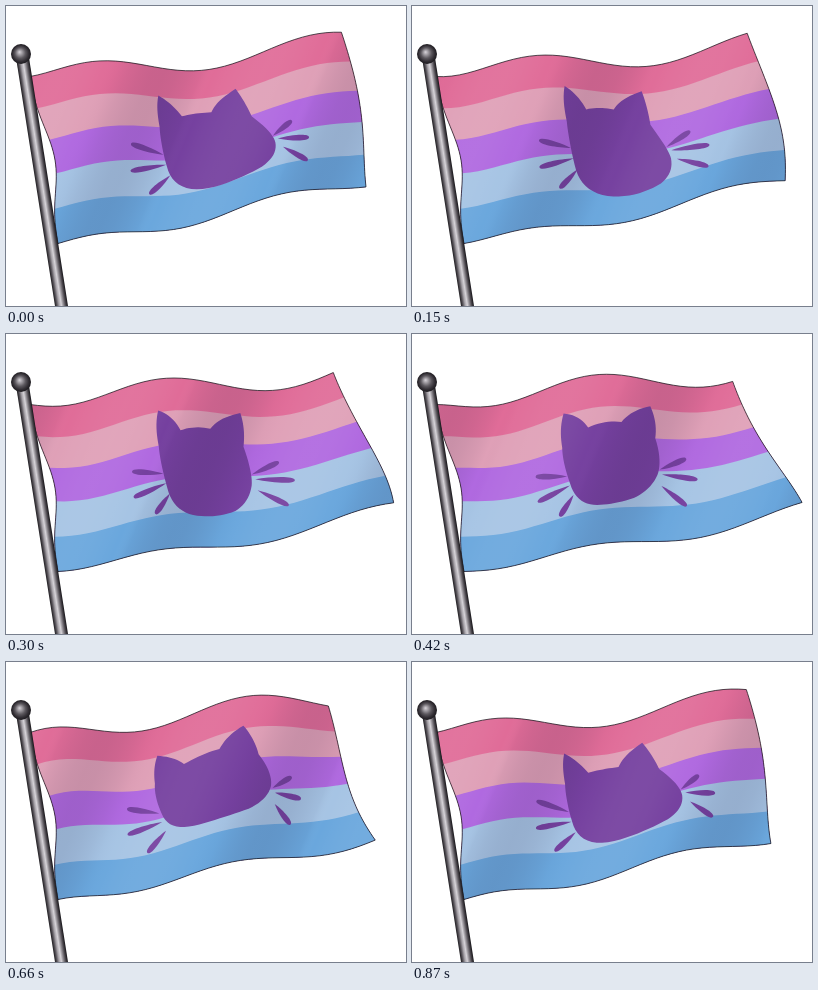
Recreate the animation shown at these times as an HTML page with a canvas. Size 400 px wide and 300 px high, loop 0.9 s.

```html
<!DOCTYPE html>
<html lang="en">
<head>
<meta charset="utf-8">
<title>Waving flag</title>
<style>
  html, body { margin: 0; width: 100%; height: 100%; overflow: hidden; background: #fff; }
  canvas { display: block; }
</style>
</head>
<body>
<canvas id="stage" width="400" height="300"></canvas>
<script>
const ctx = document.getElementById('stage').getContext('2d');
const LOOP = 900, STEP = 30, SAMPLES = 40;

// Stripe start (fraction of the cloth height) and colour.
const stripes = [[0, '#e06c98'], [.19, '#dfa0b7'], [.378, '#b069e0'], [.58, '#a6c4e4'], [.792, '#6aa7dd']];

// Head outline in cloth space: quadratic segments of control u, v and end u, v.
const headStart = [.397, .18];
const head = [
  [.44, .22, .455, .305], [.51, .28, .562, .292], [.60, .215, .668, .172], [.68, .27, .668, .39],
  [.69, .55, .678, .63], [.66, .73, .605, .775], [.535, .815, .46, .80], [.38, .78, .36, .65],
  [.34, .50, .36, .38], [.37, .27, .397, .18]];
// Base u, v and tip u, v.
const whiskers = [
  [.35, .545, .25, .485], [.355, .605, .243, .645], [.365, .67, .306, .78],
  [.684, .57, .766, .505], [.692, .60, .794, .645], [.692, .67, .756, .80]];

const wave = turns => Math.cos(2 * Math.PI * turns);

// The cloth at loop phase t: waves run from the pole (u = 0) to the free edge (u = 1).
function makeCloth(t) {
  const grow = u => 1 - Math.exp(-6 * u);
  const top = u => 70.5 - 33 * u - 12.5 * grow(u) * wave(t - 1.28 * u + .21);
  const bottom = u => 237.5 - 62.5 * u + 3.5 * Math.sin(Math.PI * u) - 7 * grow(u) * wave(t - 1.49 * u + .08);
  const left = v => 24 + 28 * v + 11 * Math.sin(Math.PI * v) ** 3;
  const right = v => 327.5 + 47 * v + (9 + 7 * v) * wave(t - .08 - .35 * v ** 1.5);

  const at = (u, v, dx = 0) => {
    const l = left(v), width = right(v) - l, s = u + dx / width;
    return [l + width * s, top(s) + (bottom(s) - top(s)) * v];
  };
  // The emblem's far side also sways sideways.
  const emblem = (u, v) => {
    const sway = Math.sin(Math.PI * Math.max(0, u - .3) / .7) ** 1.5;
    return at(u, v, 22 * sway * (.4 + .9 * v) * wave(t - .5 - .55 * v));
  };
  const chin = -.03 + .065 * wave(t - .2);
  return { at, emblem, chin };
}

function tracePath(points) {
  ctx.beginPath();
  points.forEach(p => ctx.lineTo(...p));
  ctx.closePath();
}

function traceCloth(cloth, v0) {
  const sides = [
    f => cloth.at(f, v0), f => cloth.at(1, v0 + (1 - v0) * f),
    f => cloth.at(1 - f, 1), f => cloth.at(0, 1 - (1 - v0) * f)];
  const points = [];
  for (const side of sides)
    for (let i = 0; i < SAMPLES; i++) points.push(side(i / SAMPLES));
  tracePath(points);
}

function drawHead(cloth) {
  const points = [];
  let [u, v] = headStart;
  for (const [cu, cv, eu, ev] of head) {
    for (let f = 0; f < 1; f += .1) {
      const g = 1 - f, mix = (a, c, e) => g * g * a + 2 * f * g * c + f * f * e;
      const y = mix(v, cv, ev);
      points.push(cloth.emblem(mix(u, cu, eu), y + cloth.chin * (y - .18) / .61));
    }
    [u, v] = [eu, ev];
  }
  tracePath(points);
  ctx.fill();
}

function drawWhisker(cloth, [bu, bv, tu, tv]) {
  const [x0, y0] = cloth.emblem(bu, bv), [x1, y1] = cloth.emblem(tu, tv);
  const len = Math.hypot(x1 - x0, y1 - y0);
  ctx.save();
  ctx.translate(x0, y0);
  ctx.rotate(Math.atan2(y1 - y0, x1 - x0));
  ctx.beginPath();
  ctx.moveTo(0, 0);
  ctx.bezierCurveTo(len * .4, -3, len, -4.5, len, 0);
  ctx.bezierCurveTo(len, 4.5, len * .4, 3, 0, 0);
  ctx.fill();
  ctx.restore();
}

function drawShade(cloth, t) {
  const reach = 460, shade = ctx.createLinearGradient(0, 0, reach * .92, reach * .38);
  for (let i = 0; i <= SAMPLES; i++) {
    const f = i / SAMPLES, w = wave(f * reach / 190 - t + .61);
    shade.addColorStop(f, w > 0 ? `rgba(255,255,255,${w * .06})` : `rgba(40,30,60,${-w * .13})`);
  }
  traceCloth(cloth, 0);
  ctx.fillStyle = shade;
  ctx.fill();
  ctx.strokeStyle = 'rgba(15,15,20,.8)';
  ctx.lineWidth = .9;
  ctx.stroke();
}

function metal(gradient, colors) {
  colors.forEach((c, i) => gradient.addColorStop(i / (colors.length - 1), c));
  ctx.fillStyle = gradient;
}

function drawPole() {
  const slant = .157, y = 52;
  ctx.save();
  ctx.transform(1, 0, slant, 1, -slant * 58, 0);
  metal(ctx.createLinearGradient(11, 0, 24, 0), ['#1c1a1e', '#5a565c', '#a8a4aa', '#d6d3d8', '#8e8a90', '#4a464c', '#141216']);
  ctx.fillRect(11, y, 13, 300 - y);
  ctx.restore();

  metal(ctx.createRadialGradient(13.5, 46, 0, 15, 48, 10.5), ['#d8d4da', '#9a969c', '#5c585e', '#343036', '#161418']);
  ctx.beginPath();
  ctx.arc(15, 48, 10, 0, 2 * Math.PI);
  ctx.fill();
}

function draw(ms) {
  const t = Math.floor(ms % LOOP / STEP) * STEP / LOOP;
  const cloth = makeCloth(t);
  ctx.fillStyle = '#fff';
  ctx.fillRect(0, 0, 400, 300);
  for (const [v, color] of stripes) {
    traceCloth(cloth, v);
    ctx.fillStyle = color;
    ctx.fill();
  }
  ctx.fillStyle = '#75409f';
  drawHead(cloth);
  whiskers.forEach(w => drawWhisker(cloth, w));
  drawShade(cloth, t);
  drawPole();
}

const start = performance.now();
function tick() {
  draw(performance.now() - start);
  requestAnimationFrame(tick);
}
tick();
</script>
</body>
</html>
```
